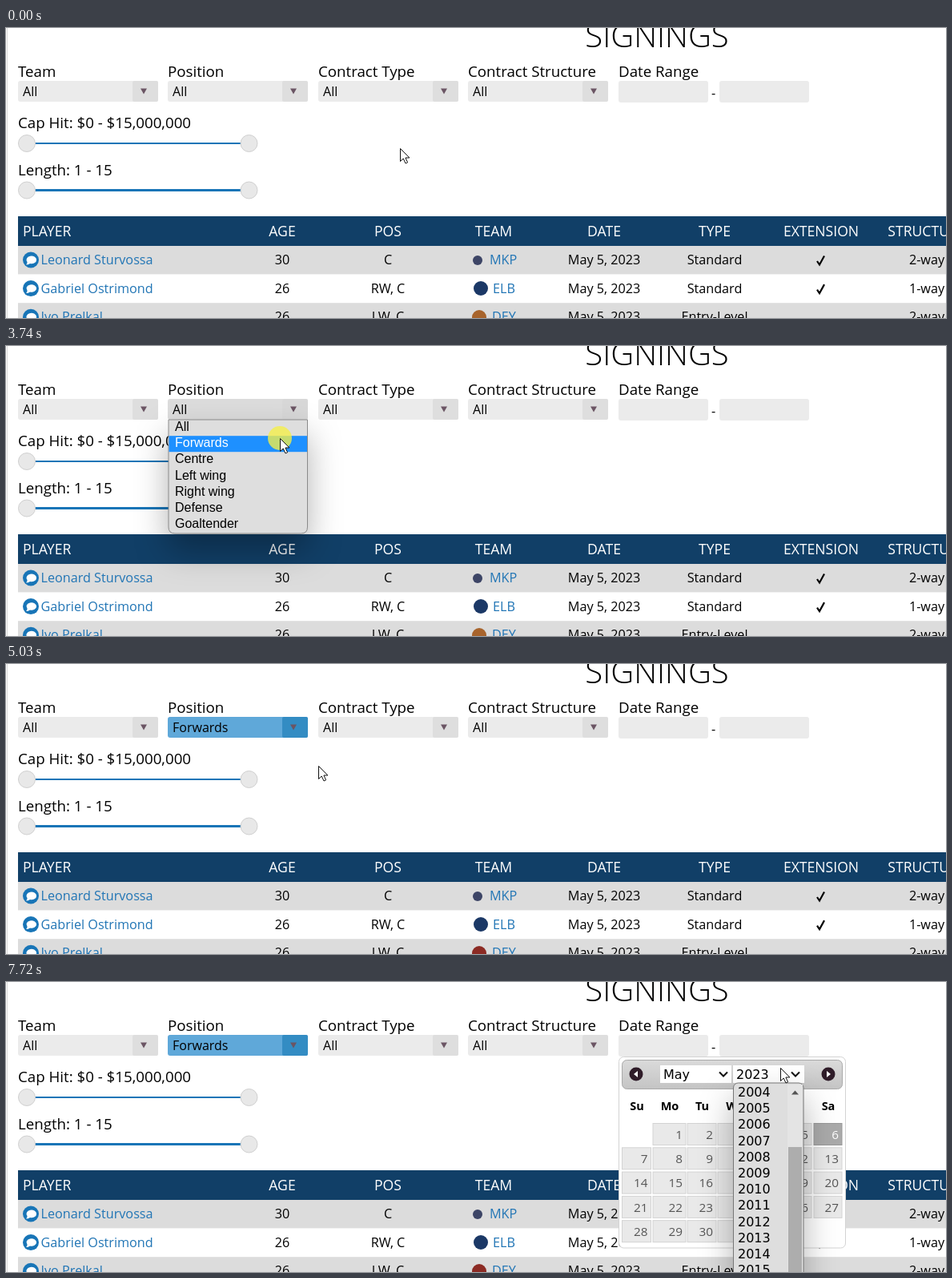
Animation of 1174 by 362 pixels, one loop 8 s. Source, as an HTML page:

```html
<!DOCTYPE html>
<html lang="en">
<head>
<meta charset="utf-8">
<title>Signings</title>
<style>
  html, body { margin: 0; width: 100%; height: 100%; overflow: hidden; background: #fff; }
  svg { display: block; font: 16.2px "Open Sans", sans-serif; }
  .label { font-size: 18.72px; }
  .title { font-size: 40px; font-weight: 300; }
  .head { font-size: 17.6px; fill: #fff; }
  .link { fill: #2175b5; }
  .field { font-size: 16px; }
  .option { font: 16px "Liberation Sans", Arial, sans-serif; }
  .mono { font: 16px "DejaVu Sans", Verdana, sans-serif; }
  .weekday { font-size: 14.5px; font-weight: 700; }
  .day { font-size: 15.3px; fill: #555; }
  .mid { text-anchor: middle; }
  .end { text-anchor: end; }
  .popup { filter: drop-shadow(0 20px 20px rgba(0, 0, 0, .3)); }
</style>
</head>
<body>
<script>
const LOOP = 8000, STEP = 70;
const GREY = '#ebebeb';

const text = (x, y, s, cls = '', attrs = '') => `<text x="${x}" y="${y}" class="${cls}" ${attrs}>${s}</text>`;
const rect = (x, y, w, h, fill, attrs = '') =>
  `<rect x="${x}" y="${y}" width="${w}" height="${h}" fill="${fill}" ${attrs}/>`;
const circle = (x, y, r, fill, attrs = '') => `<circle cx="${x}" cy="${y}" r="${r}" fill="${fill}" ${attrs}/>`;
const path = (d, attrs) => `<path d="${d}" ${attrs}/>`;
const group = (id, body, attrs = '') => `<g id="${id}" ${attrs}>${body}</g>`;

function select(x, label, id) {
  return text(x, 61, label, 'label') +
    rect(x, 66, 175, 26, GREY, `rx="3" id="${id}Body"`) +
    rect(x + 143, 66, 32, 26, '#dedede', `rx="2" id="${id}Button"`) +
    text(x + 6, 85, 'All', 'field', `id="${id}Text"`) +
    path(`M${x + 153} 75.5h8l-4 7z`, 'fill="#6b5564"');
}

function slider(y, label, weight) {
  const knob = x => circle(x, y, 10.5, '#e8e8e8', 'stroke="#d0d0d0"');
  return text(15, y - 19, label, 'label') +
    rect(26, y - weight / 2, 278, weight, '#1875b7') + knob(26) + knob(303.5);
}

function row(i, name, age, pos, team, teamX, type, way, extended) {
  const y = 272 + i * 35.6, base = y + 23, mid = y + 17.5;
  const cell = (x, s) => text(x, base, s, 'mid');
  return (i % 2 ? '' : rect(15, y, 1159, 35.4, '#dcdcdc')) +
    circle(31, mid, 10, '#1875b7') +
    path(`M25 ${mid + 6}q2-2 1.5-3.5a6.3 4.8 0 1 1 3.5 2q-2 1.5-5 1.5`, 'fill="#fff"') +
    text(43.5, base, name, 'link') + cell(345, age) + cell(477, pos) +
    text(teamX, base, team, 'link') + cell(747, 'May 5, 2023') + cell(885, type) + cell(1150, way) +
    (extended ? path(`M1013 ${mid + 1.5}l3 4.5 6-11`, 'fill="none" stroke="#000" stroke-width="2.2"') : '');
}

const heads = [['AGE', 345], ['POS', 477], ['TEAM', 609], ['DATE', 747], ['TYPE', 885], ['EXTENSION', 1018], ['STRUCTURE', 1150]];
const page =
  rect(1, 0, 1, 362, '#d8d8d8') +
  text(813, 23.5, 'SIGNINGS', 'title mid') +
  select(15, 'Team', 'team') + select(202, 'Position', 'pos') +
  select(390, 'Contract Type', 'type') + select(577, 'Contract Structure', 'struct') +
  text(765, 61, 'Date Range', 'label') +
  rect(765, 66, 112, 27, GREY, 'rx="3" id="dateFrom"') + text(881, 87, '-') + rect(891, 66, 112, 27, GREY, 'rx="3"') +
  slider(144, 'Cap Hit: $0 - $15,000,000', 2) + slider(202.5, 'Length: 1 - 15', 3) +
  rect(15, 235, 1159, 37, '#113f67') + text(21, 260, 'PLAYER', 'head') +
  heads.map(([s, x]) => text(x, 260, s, 'head mid')).join('') +
  row(0, 'Leonard Sturvossa', 30, 'C', 'MKP', 604, 'Standard', '2-way', true) +
  row(1, 'Gabriel Ostrimond', 26, 'RW, C', 'ELB', 608, 'Standard', '1-way', true) +
  row(2, 'Ivo Prelkal', 26, 'LW, C', 'DEY', 607, 'Entry-Level', '2-way', false) +
  circle(589, 290, 6, '#3d4566') + circle(593, 325, 9, '#1b3866') +
  circle(591, 361, 9, '#a8642c', 'id="badge"');

const positions = ['All', 'Forwards', 'Centre', 'Left wing', 'Right wing', 'Defense', 'Goaltender'];
const positionList = group('positionList',
  path('M203 92h173.5v134q0 8-8 8h-157.5q-8 0-8-8z', 'fill="#dedede" stroke="#8a8a8a"') +
  rect(203.5, 92, 172.5, 20, '#1e90ff', 'id="highlight"') +
  positions.map((s, i) => text(211, 106 + i * 20.2, s, 'option', `id="option${i}"`)).join(''), 'class="popup"');

// Right edge and width of each weekday column
const columns = [[805.5, 36], [849, 41], [887, 36], [931, 42], [968, 35], [1006, 35], [1044, 35]];
const chevron = x => path(`M${x - 5} 112.5l5 5 5-5`, 'fill="none" stroke="#111" stroke-width="2"');
const arrowButton = (x, d) => circle(x, 115, 8.5, '#2f1c29') + path(`M${x - 2 * d} 111l${5 * d} 4-${''}${''}`.replace(/-$/, '') + `L${x - 2 * d} 119z`, 'fill="#fff"');

function calendar() {
  let out = rect(765.5, 93.5, 283, 238.5, '#fff', 'rx="6" stroke="#d3d3d3"') +
    rect(769.5, 97.5, 275, 36, 'url(#bar)', 'rx="6" stroke="#aaa"') +
    arrowButton(787, -1) + arrowButton(1027, 1) +
    rect(817, 104, 89, 22, '#fff') + text(821, 121, 'May', 'mono') + chevron(896) +
    rect(908, 104, 89, 22, '#fff') + text(912, 121, '2023', 'mono') + chevron(986);
  ['Su', 'Mo', 'Tu', 'We', 'Th', 'Fr', 'Sa'].forEach((s, i) => {
    out += text(columns[i][0] - columns[i][1] / 2 + .5, 160, s, 'weekday mid');
  });
  for (let day = 1; day <= 31; day++) {
    const [right, width] = columns[day % 7], y = 176.5 + Math.floor(day / 7) * 30.3, today = day === 6;
    out += rect(right - width, y, width, 27, today ? '#aaa' : '#e9e9e9', `stroke="${today ? '#999' : '#d3d3d3'}"`) +
      text(right - 4, y + 19.3, day, 'day end', today ? 'style="fill:#fff"' : '');
  }
  return group('calendar', out);
}

const yearList = group('yearList',
  rect(908.5, 126, 87.5, 260, '#dedede', 'rx="6" stroke="#777"') +
  rect(976, 128, 19, 240, '#e4e4e4') + rect(977, 206, 17, 160, '#adadad') +
  path('M981 140.500h9l-4.500-5z', 'fill="#555"') +
  Array.from({ length: 12 }, (_, i) => text(914, 143 + i * 20.2, 2004 + i, 'mono')).join(''), 'class="popup"');

const pointer = group('pointer',
  circle(0, 0, 15, '#f5f046', 'opacity=".78" id="click"') +
  path('M.5.5V16.500l3.700-3.500 2.800 6 2.600-1.200-2.700-5.800h5z', 'id="arrow" fill="#fff" stroke="#111"') +
  path('M-4-8h2.500l1.500 1 1.500-1h2.500M-4 8h2.500l1.500-1 1.500 1h2.500M0-7v14', 'id="beam" fill="none" stroke="#222" stroke-width="1.3"'));

document.body.innerHTML = `<svg width="1174" height="362" viewBox="0 0 1174 362">
  <linearGradient id="bar" x2="0" y2="1"><stop stop-color="#dadada"/><stop offset="1" stop-color="#c4c4c4"/></linearGradient>
  ${page}${positionList}${calendar()}${rect(768, 70, 1.6, 18, '#111', 'id="caret"')}${yearList}${pointer}</svg>`;

const $ = id => document.getElementById(id);
const show = (id, on) => { $(id).style.display = on ? '' : 'none'; };
const fill = (id, colour) => $(id).setAttribute('fill', colour);
const clamp = v => Math.max(0, Math.min(1, v));
const ramp = (t, from, to) => clamp((t - from) / (to - from));
const within = (t, ...spans) => spans.some(([from, to]) => t >= from && t < to);
const ease = p => p * p * p * (p * (6 * p - 15) + 10);
const mix = (a, b, p) => `rgb(${a.map((v, i) => Math.round(v + (b[i] - v) * p))})`;
const grey = v => [v, v, v];

// Start time, step count, then the four points of a cubic curve
const moves = [
  [660, 16, [492, 150], [446, 128], [399, 103], [353, 81]],
  [2580, 9, [353, 81], [350, 92], [346, 104], [342, 115]],
  [4750, 18, [342, 115], [450, 150], [640, 148], [829, 75]],
  [6740, 12, [829, 75], [875, 86], [921, 97], [967, 107]],
];

function pointerAt(t) {
  const [start, steps, a, b, c, d] = moves.findLast(m => t >= m[0]) || moves[0];
  const s = ease(clamp((Math.floor((t - start) / STEP) + 1) / steps)), r = 1 - s;
  return [0, 1].map(i => r * r * r * a[i] + 3 * r * r * s * b[i] + 3 * r * s * s * c[i] + s * s * s * d[i]);
}

function draw(t) {
  const [x, y] = pointerAt(t);
  const inDate = x > 765 && x < 877 && y > 66 && y < 93;
  $('pointer').setAttribute('transform', `translate(${Math.round(x)} ${Math.round(y)})`);
  show('arrow', !inDate);
  show('beam', inDate);
  show('click', within(t, [1910, 2050], [3740, 3880], [6200, 6340], [7650, 7720]));

  const hover = ramp(t, 1430, 1710), active = ramp(t, 3840, 4020);
  fill('posBody', active ? mix(grey(220), [95, 168, 217], active) : mix(grey(235), grey(220), hover));
  fill('posButton', active ? mix(grey(216), [51, 140, 195], clamp(active * 1.5)) : mix(grey(222), grey(216), hover));
  $('posText').textContent = t < 3810 ? 'All' : 'Forwards';
  fill('badge', t < 3880 ? '#a8642c' : '#8c2b24');

  const chosen = y > 112 ? 1 : 0;
  show('positionList', within(t, [1980, 3810]));
  $('highlight').setAttribute('y', 92 + chosen * 20.2);
  [0, 1].forEach(i => fill('option' + i, i === chosen ? '#fff' : '#000'));

  fill('dateFrom', mix(grey(235), grey(221), ramp(t, 5800, 5940) - ramp(t, 6950, 7150)));
  show('calendar', t >= 6200);
  $('calendar').style.opacity = ramp(t, 6200, 6400);
  show('caret', within(t, [6240, 6740], [7240, 7650]));
  show('yearList', t >= 7720);
}

function tick() {
  draw(performance.now() % LOOP);
  requestAnimationFrame(tick);
}
tick();
</script>
</body>
</html>
```
